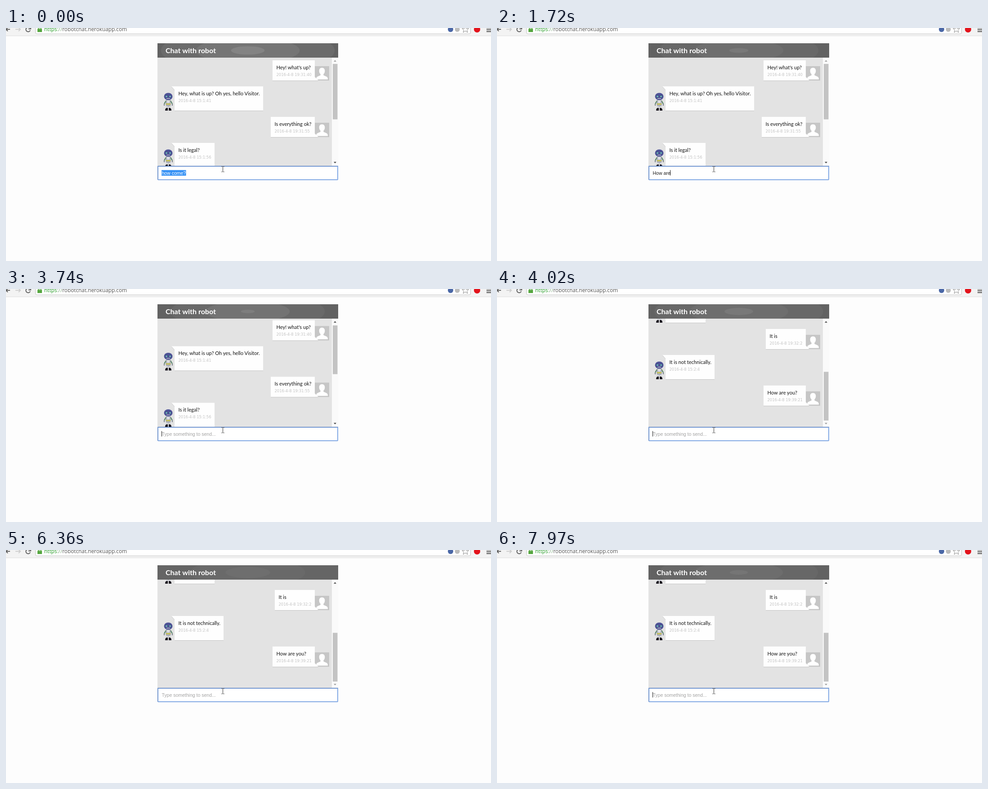
An HTML page for the animation above (8000 ms loop, 1079 by 519 pixels).

```html
<!DOCTYPE html>
<html lang="en">
<head>
<meta charset="utf-8">
<title>Chat with robot</title>
<style>
html, body { margin: 0; width: 100%; height: 100%; overflow: hidden; background: #fdfdfd; }
svg { display: block; width: 1079px; height: 519px; }
text { white-space: pre; }
.url { font: 11.8px "Open Sans", sans-serif; fill: #555; }
.title { font: bold 16px Lato, sans-serif; fill: #fff; }
.msg { font: 11.1px Lato, sans-serif; fill: #111; }
.time { font: 8.4px "DejaVu Sans", sans-serif; fill: #c3c3c3; }
.field { font: 10.5px "Liberation Sans", Arial, sans-serif; fill: #222; }
</style>
</head>
<body>
<svg viewBox="0 0 1079 519">
  <defs>
    <clipPath id="headClip"><path d="M337 34h402v32H337z"/></clipPath>
    <clipPath id="listClip"><path d="M337 66h388v241H337z"/></clipPath>
    <g id="person">
      <path fill="#c6c6c6" d="M0 0h32v32H0z"/>
      <path fill="#fff" d="M16 3.500c4.200 0 6.300 3 6.300 7 0 3-1.200 5.800-3 7.300v2.200c2 2 8 2.500 9.200 6l.5 3.500H3l.5-3.500c1.200-3.500 7.200-4 9.200-6v-2.200c-1.800-1.500-3-4.300-3-7.300 0-4 2.100-7 6.300-7z"/>
    </g>
    <g id="robot">
      <path d="M-5 18l-4 7M5 18l4 7" stroke="#4d7f5c" stroke-width="2"/>
      <path d="M-9 25v4M9 25v4" stroke="#7d838c" stroke-width="2"/>
      <path d="M-5 16h10l1 10-2 6h-8l-2-6z" fill="#a9adb6"/>
      <path d="M-3 17h6v6h-6z" fill="#dcdee2"/>
      <path d="M-5 24h10v3H-5z" fill="#c9c356"/>
      <path d="M-3 30v5M3 30v5" stroke="#d3d5da" stroke-width="4"/>
      <path d="M-7 40q0-6 4-6h2v6zM7 40q0-6-4-6h-2v6z" fill="#17131d"/>
      <ellipse cy="8.500" rx="9.500" ry="8" fill="#4d5297"/>
      <path d="M-4 13h8" stroke="#a3a3bd" stroke-width="2"/>
      <g fill="#70b5c3" stroke="#39466f"><circle cx="-4" cy="8.500" r="2.500"/><circle cx="4" cy="8.500" r="2.500"/></g>
    </g>
  </defs>

  <g id="browser">
    <path fill="#f3f3f3" d="M0 0h1079v17H0z"/>
    <path stroke="#e0e0e0" d="M0 17.500h1079"/>
    <path fill="#fff" stroke="#c2c2c2" d="M65.500-2v12q0 3 3 3h962q3 0 3-3V-2"/>
    <g fill="none" stroke-width="2">
      <path stroke="#626262" d="M9 3H1M4-1L0 3l4 4"/>
      <path stroke="#cfcfcf" d="M21 3h10M28-1l4 4-4 4"/>
      <path stroke="#626262" d="M53 0a5 5 0 1 0 1 5M55-2v4h-5"/>
    </g>
    <path fill="#55a63f" d="M70 2h10v7H70z"/>
    <path fill="none" stroke="#55a63f" stroke-width="1.500" d="M72 3V0h6v3"/>
    <text class="url" x="85" y="7"><tspan fill="#239a23">https</tspan><tspan fill="#7aa87a">://</tspan>robotchat.herokuapp.com</text>
    <circle cx="989" cy="3" r="6" fill="#4a67a6"/>
    <circle cx="1004" cy="3" r="5.500" fill="#bcbcbc"/>
    <path fill="#fff" stroke="#8b8b8b" d="M1022-4l2 5h5.500l-4 3.500 1.500 5.500-5-3.500-5 3.500 1.500-5.500-4-3.500h5.500z"/>
    <circle cx="1048" cy="3" r="7" fill="#e3131c"/>
    <path stroke="#555" stroke-width="2" d="M1069 0h10M1069 4h10M1069 8h10"/>
  </g>

  <path fill="#626262" d="M337 34h402v32H337z"/>
  <g id="rings" clip-path="url(#headClip)" fill="#fff"></g>
  <text class="title" x="355" y="56">Chat with robot</text>

  <path fill="#e3e3e3" d="M337 66h388v241H337z"/>
  <g clip-path="url(#listClip)"><g id="list"></g></g>
  <path fill="#fafafa" d="M725 66h14v241h-14z"/>
  <rect id="thumb" x="727" width="10.500" fill="#c3c3c3"/>
  <path id="up" d="M729 75l3-3.500 3 3.500z"/>
  <path id="down" d="M729 298l3 3.500 3-3.500z"/>

  <rect x="338" y="308" width="400" height="30" rx="1" fill="#fff" stroke="#82a9e4" stroke-width="2"/>
  <path fill="none" stroke="#6485bd" d="M337.500 338V307.500H739"/>
  <rect id="select" x="346" y="316.500" width="54.500" height="12.500" fill="#3390f5"/>
  <text id="field" class="field" x="346.500" y="326.500"></text>
  <path id="caret" stroke="#111" d="M0 316.500v12"/>
  <path fill="none" stroke="#333" d="M479.500 308.500h2l1 1 1-1h2M482.500 309v11M479.500 320.500h2l1-1 1 1h2"/>
</svg>
<script>
const LOOP = 8000, TICK = 133.5, BLINK = 530;
const SENT = 3620, SCROLL_AT = 3719, SCROLL_MS = 286, SCROLL_PX = 235;
const $ = id => document.getElementById(id);

function add(parent, tag, attrs, text) {
  const el = document.createElementNS("http://www.w3.org/2000/svg", tag);
  for (const key in attrs) el.setAttribute(key, attrs[key]);
  if (text) el.textContent = text;
  return parent.appendChild(el);
}
const show = (el, on) => el.setAttribute("visibility", on ? "visible" : "hidden");

// Visitor and robot take turns, visitor first
const messages = [
  ["Hey! what's up?", "2016-4-8 19:31:40"],
  ["Hey, what is up? Oh yes, hello Visitor.", "2016-4-8 15:1:41"],
  ["Is everything ok?", "2016-4-8 19:31:55"],
  ["Is it legal?", "2016-4-8 15:1:56"],
  ["It is", "2016-4-8 19:32:2"],
  ["It is not technically.", "2016-4-8 15:2:4"],
  ["How are you?", "2016-4-8 19:39:21"]
];

function addMessage([text, time], i) {
  const user = i % 2 === 0, h = user ? 45 : 54;
  const top = 72 + 126 * Math.floor(i / 2) + (user ? 0 : 58);
  const g = add($("list"), "g", { transform: `translate(0 ${top})` });
  add(g, "use", user ? { href: "#person", x: 687, y: 13 } : { href: "#robot", x: 361, y: 14 });
  const back = add(g, "path", { fill: "#c4c4c4", transform: "translate(0 1)" });
  const front = add(g, "path", { fill: "#fefefe" });
  const lines = [
    add(g, "text", { class: "msg", y: 19.5 }, text),
    add(g, "text", { class: "time", y: 34.5 }, time)
  ];
  const width = Math.round(Math.max(...lines.map(l => l.getComputedTextLength()))) + 16;
  const left = user ? 687 - width : 375;
  const shape = user
    ? `M${left} 0H687V37L695 ${h}H${left}z`
    : `M368 0H${left + width}V${h}H375V8z`;
  lines.forEach(l => l.setAttribute("x", left + 8.5));
  [back, front].forEach(p => p.setAttribute("d", shape));
  return g;
}
const lastMessage = messages.map(addMessage).pop();

// Each header ripple: start time and speed in px per second
const waves = [[-1400, 21], [1200, 33], [SENT, 62], [5270, 41.5], [7320, 22]];
const rings = [0, 1, 2].map(() => add($("rings"), "ellipse", { cx: 538, cy: 50 }));

function drawRipples(t) {
  const [from, speed] = waves.filter(w => w[0] <= t).pop();
  const fade = Math.exp(-(t - Math.max(0, from)) / 900);
  rings.forEach((ring, i) => {
    const r = 8 + speed * (t - from) / 1000 + 78 * i;
    ring.setAttribute("rx", r);
    ring.setAttribute("ry", r / 4);
    ring.setAttribute("fill-opacity", .1 * fade / (1 + .4 * i));
  });
}

// An even typing beat with a pause before each space
const phrase = "How are you?";
const keyTimes = [...phrase].map((_, i) =>
  510 + 145 * i + 250 * (phrase.slice(0, i + 1).split(" ").length - 1));

function drawField(t) {
  const pressed = keyTimes.filter(k => k <= t);
  const sent = t >= SENT, selected = !pressed.length;
  const typed = sent ? "" : phrase.slice(0, pressed.length);
  const field = $("field");
  field.textContent = selected ? "how come?" : typed || "Type something to send...";
  field.style.fill = selected ? "#fff" : sent ? "#a3a3a3" : "#222";
  show($("select"), selected);
  const since = t - (sent ? SENT : pressed.pop());
  show($("caret"), !selected && Math.floor(since / BLINK) % 2 === 0);
  const x = 346.5 + (typed ? Math.round(field.getComputedTextLength()) : 0);
  $("caret").setAttribute("transform", `translate(${x} 0)`);
}

function drawList(t) {
  const k = Math.min(1, Math.max(0, (t - SCROLL_AT) / SCROLL_MS));
  const eased = .5 - Math.cos(Math.PI * k) / 2;
  const sent = t >= SCROLL_AT;
  $("list").setAttribute("transform", `translate(0 ${-SCROLL_PX * eased})`);
  show(lastMessage, sent);
  $("thumb").setAttribute("y", 80 + 104.5 * eased);
  $("thumb").setAttribute("height", sent ? 108.5 : 123.5);
  $("up").setAttribute("fill", k > 0 ? "#505050" : "#a3a3a3");
  $("down").setAttribute("fill", k < 1 ? "#505050" : "#a3a3a3");
}

function draw(t) {
  // Ripples and scrolling refresh once per tick
  const held = Math.floor(t / TICK) * TICK;
  drawRipples(held);
  drawList(held);
  drawField(t);
}

const start = performance.now();
function frame() {
  draw((performance.now() - start) % LOOP);
  requestAnimationFrame(frame);
}
frame();
</script>
</body>
</html>
```
